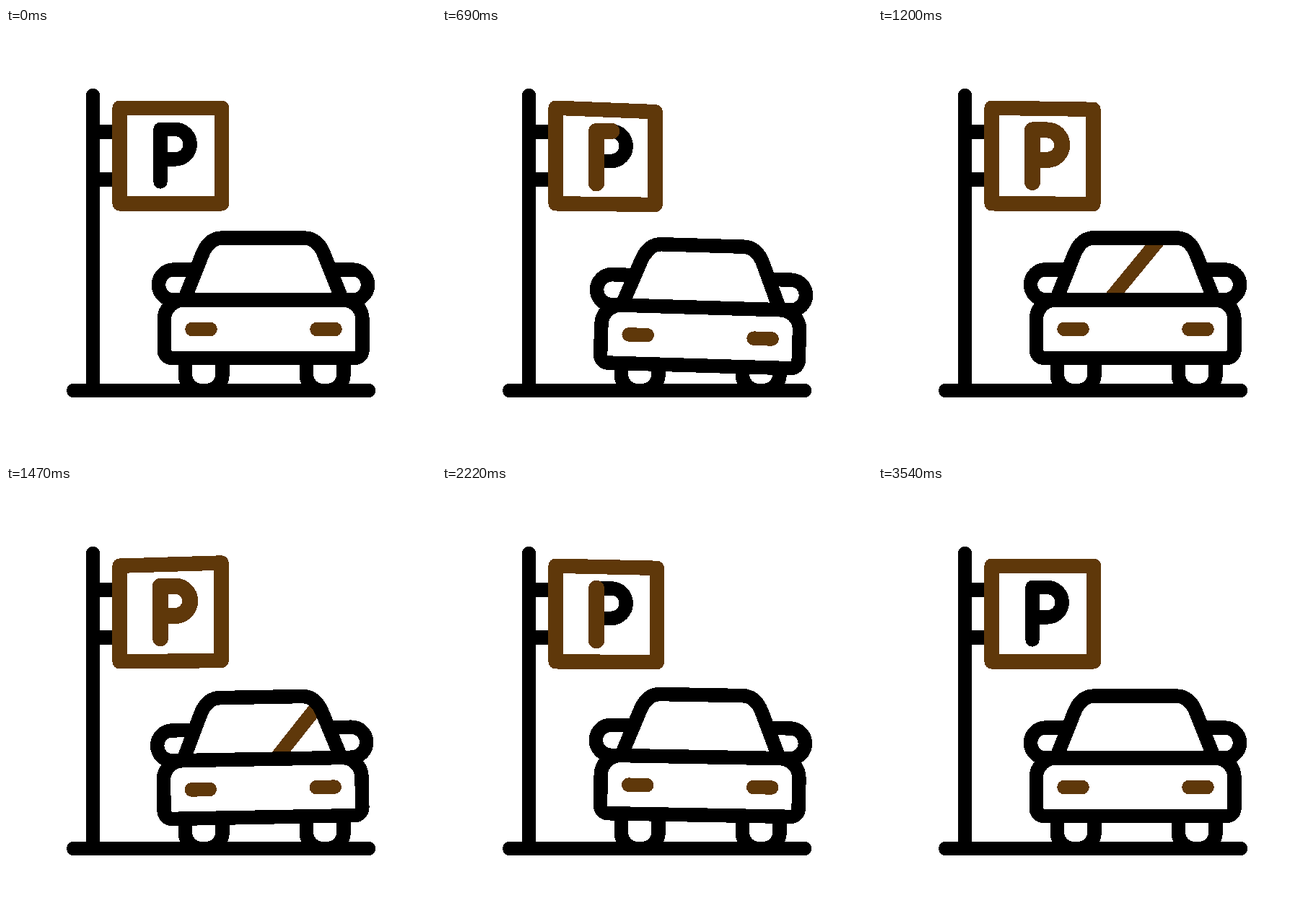
Animation of 596x596 px, one loop 4.23 s. Source, as an HTML page:

```html
<!DOCTYPE html>
<html>
<head>
<meta charset="utf-8">
<title>Parking</title>
<style>
  html, body { margin: 0; width: 100%; height: 100%; overflow: hidden; background: #fff; }
  svg { display: block; width: 100%; height: 100%; }
  path { fill: none; stroke: #000; stroke-width: 19.5; stroke-linecap: round; stroke-linejoin: round; }
  .brown { stroke: #5f380a; }
  .solid { fill: #fff; }
</style>
</head>
<body>
<svg viewBox="0 0 596 596" shape-rendering="crispEdges">
  <defs>
    <path id="mirror" d="M262 335H232.5a21 21 0 0 0 0 42H250"/>
    <path id="wheel" d="M248.300 458V480a22.500 22.500 0 0 0 22.500 22.500h6.700a22.500 22.500 0 0 0 22.500-22.500V458"/>
    <path id="letter" d="M214 213V140.5H234.5a20.7 20.7 0 0 1 0 41.4H214"/>
    <clipPath id="window"><path d="M247 377L272 314Q281 291 300 291H413Q432 291 441 314L466 377z"/></clipPath>
  </defs>

  <path d="M93.700 502.500H502.500M120.500 93.500V502M120.500 144H150M120.500 210H150"/>
  <use href="#wheel"/>
  <use href="#wheel" x="168"/>

  <g id="car">
    <use href="#mirror"/>
    <use href="#mirror" transform="translate(713) scale(-1 1)"/>
    <path class="solid" d="M247 377L272 314Q281 291 300 291H413Q432 291 441 314L466 377z"/>
    <g clip-path="url(#window)"><path id="glint" class="brown" d="M264 387L354.500 277"/></g>
    <path d="M247 377L272 314Q281 291 300 291H413Q432 291 441 314L466 377"/>
    <path class="solid" d="M219.3 404a27 27 0 0 1 27-27H467a27 27 0 0 1 27 27V446.500a11 11 0 0 1-11 11H230.300a11 11 0 0 1-11-11z"/>
    <path class="brown" d="M258 417.500H283M431 417.500H456"/>
  </g>

  <path id="board" class="brown solid" style="stroke-width:20.400"/>
  <g id="sign">
    <use href="#letter"/>
    <path id="ink" class="brown" pathLength="1" style="stroke-width:22" d="M214 213V140.5H234.5a20.7 20.7 0 0 1 0 41.4H214"/>
  </g>
</svg>
<script>
  const LOOP = 4230, STEP = 30, BOUNCE = 1230;
  const el = id => document.getElementById(id);
  const [car, glint, board, sign, ink] = ["car", "glint", "board", "sign", "ink"].map(el);

  const smooth = u => (1 - Math.cos(Math.PI * u)) / 2;

  // Keys are [time, value] pairs, eased in and out between neighbours.
  function track(keys, t) {
    const i = keys.findIndex(k => k[0] > t);
    if (i < 0) return keys[keys.length - 1][1];
    if (i === 0) return keys[0][1];
    const [t0, a] = keys[i - 1], [t1, b] = keys[i];
    return a + (b - a) * smooth((t - t0) / (t1 - t0));
  }

  const swing = [[0, 0], [900, 6.3], [1660, -6], [2250, 3.2], [2790, -3.2], [3300, 1.2], [3540, 0]];
  const tilt = [[0, 0], [330, -1.3], [770, 2], [BOUNCE, 0]];
  const drop = [[0, 0], [180, 0], [420, 10.5], [690, 10.4], [1050, -2.3], [BOUNCE, 0]];
  const inkAmount = t => Math.max(0, Math.min(1, (t - 405) / 540, (2440 - t) / 540));

  function draw(t) {
    const phase = t < 2 * BOUNCE ? t % BOUNCE : 0;
    car.setAttribute("transform",
      `translate(0 ${track(drop, phase)}) rotate(${track(tilt, phase)} 356.5 455)`);
    glint.setAttribute("transform", `translate(${(t - 960) * 0.202})`);

    const d = track(swing, t), right = 299.2 - 0.08 * d * d - 0.2 * d;
    board.setAttribute("d", `M157.5 110.7L${right} ${110.7 + d}V${243.3 + 0.3 * d}L157.5 243.3z`);
    sign.setAttribute("transform", `translate(0 ${0.45 * d})`);

    const amount = inkAmount(t);
    ink.style.display = amount ? "" : "none";
    ink.style.strokeDasharray = `${amount} 2`;
  }

  function tick() {
    const t = performance.now() % LOOP;
    draw(Math.floor(t / STEP) * STEP);
    requestAnimationFrame(tick);
  }
  tick();
</script>
</body>
</html>
```
